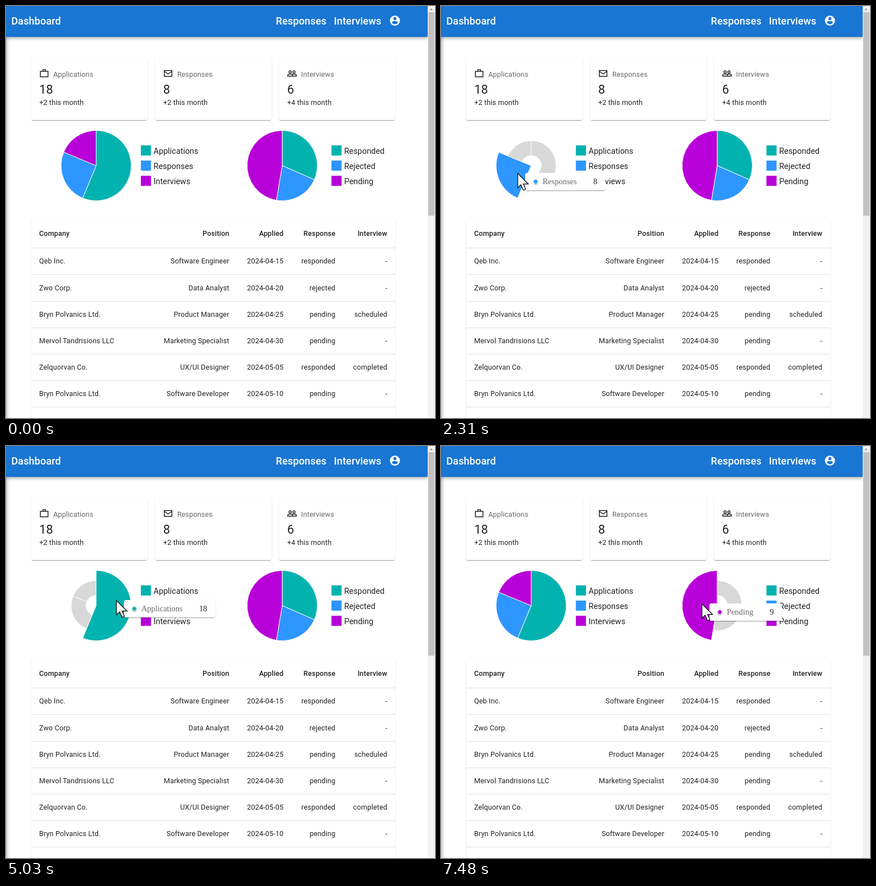
Write an HTML page that moves like this. It is 764 px wide and 733 px high and loops after 8000 ms.

```html
<!DOCTYPE html>
<html lang="en">
<head>
<meta charset="utf-8">
<title>Dashboard</title>
<style>
  html, body { margin: 0; width: 100%; height: 100%; overflow: hidden; background: #fff; }
  #stage { position: absolute; left: 0; top: 0; width: 764px; height: 733px; overflow: hidden; }
  svg, .paper, #bar { position: absolute; }
  svg { left: 0; top: 0; font: 12.6px Roboto, sans-serif; fill: rgba(0,0,0,.87); }
  .paper, .mark {
    background: #fff; border-radius: 3.6px;
    box-shadow: 0 1.8px .9px -.9px rgba(0,0,0,.2), 0 .9px .9px rgba(0,0,0,.14), 0 .9px 2.7px rgba(0,0,0,.12);
  }
  #bar {
    left: 0; top: 0; width: 751px; height: 54.5px; background: #1976d2;
    box-shadow: 0 1.8px 3.6px -.9px rgba(0,0,0,.2), 0 3.6px 4.5px rgba(0,0,0,.14), 0 .9px 9px rgba(0,0,0,.12);
  }
  #edge { position: absolute; left: 0; top: 0; width: 8px; height: 733px;
    background: linear-gradient(90deg, rgba(0,0,0,.24), rgba(0,0,0,.08) 45%, rgba(0,0,0,0)); }
  .body { letter-spacing: .135px; }
  .nav { font-size: 18px; font-weight: 500; letter-spacing: .135px; fill: #fff; }
  .head { font-weight: 500; letter-spacing: .135px; }
  .muted { letter-spacing: .135px; fill: rgba(0,0,0,.6); }
  .count { font-size: 21.6px; }
  .legend { font-size: 14.4px; }
  .icon { fill: none; stroke: #222; stroke-width: 2; }
  #tip { left: 0; top: 0; height: 31px; display: flex; align-items: center; white-space: nowrap;
    padding: 0 14.4px 0 13.6px; font: 14.4px "Liberation Serif", serif; color: rgba(0,0,0,.6); }
  .mark { width: 7.2px; height: 7.2px; border: 1.8px solid #fff; border-radius: 50%; margin-right: 8.2px; }
  #value { margin-left: 29.4px; color: rgba(0,0,0,.87); }
</style>
</head>
<body>
<div id="stage">
  <div id="edge"></div>
  <div id="bar"></div>
  <svg id="page" width="764" height="733"></svg>
  <div id="tip" class="paper"><span class="mark" id="mark"></span><span id="name"></span><span id="value"></span></div>
  <svg id="top" width="764" height="733">
    <path id="arrow" fill="#fff" stroke="#000" stroke-width="1.2" d="M.7 .9V26.3L6.4 21 10.6 30.8 14.8 29 10.8 19.7H19.6Z"/>
    <path id="beam" fill="none" stroke="#000" stroke-width="2.6" d="M-8-13h5.5L0-11 2.5-13H8M0-11V11M-8 13h5.5L0 11 2.5 13H8"/>
  </svg>
</div>
<script>
const LOOP = 8000;
const COLORS = ['#02b2af', '#2e96ff', '#b800d8'];
const RADIUS = 62.5, INSET = 18;

const $ = id => document.getElementById(id);
const page = $('page');
const mix = (a, b, p) => a + (b - a) * p;

function add(tag, attrs, content) {
  const el = document.createElementNS('http://www.w3.org/2000/svg', tag);
  for (const key in attrs) el.setAttribute(key, attrs[key]);
  if (content) el.textContent = content;
  return page.appendChild(el);
}
const text = (cls, x, y, content, anchor = 'start') =>
  add('text', { class: cls, x, y, 'text-anchor': anchor }, content);
const rect = (x, y, width, height, fill) => add('rect', { x, y, width, height, fill });

function paper(x, y, w, h) {
  const el = document.createElement('div');
  el.className = 'paper';
  el.style.cssText = `left:${x}px;top:${y}px;width:${w}px;height:${h}px`;
  $('stage').insertBefore(el, page);
}

// Header and scrollbar
text('nav', 9.4, 33, 'Dashboard');
text('nav', 480.6, 33, 'Responses');
text('nav', 584.1, 33, 'Interviews');
add('circle', { cx: 692.6, cy: 26, r: 9, fill: '#fff' });
add('circle', { cx: 692.6, cy: 22.4, r: 2.7, fill: '#1976d2' });
add('path', { d: 'M687.2 29.6c0-3.7 10.8-3.7 10.8 0c-2.6 3.9-8.2 3.9-10.8 0z', fill: '#1976d2' });
rect(751, 0, 13, 733, '#f1f1f1');
rect(752, 11, 11, 362, '#c1c1c1');
add('path', { d: 'M754 7.5L757.3 4L760.6 7.5Z', fill: '#a3a3a3' });

// Summary cards
const person = x => `M${x - 2.7} 8.5a2.7 2.7 0 1 0 5.4 0a2.7 2.7 0 1 0-5.4 0`;
const ICONS = [
  'M3 7H21V20H3ZM9 7V3H15V7',
  'M3 5H21V19H3ZM3 7L12 13L21 7',
  person(7.5) + person(16.5) + 'M1.8 18.2V16.2C1.8 13 13.2 13 13.2 16.2V18.2ZM12.5 14.6C15 13 22.2 13.4 22.2 16.2V18.2H13.2'
];
[['Applications', 18, 2], ['Responses', 8, 2], ['Interviews', 6, 4]].forEach(([title, count, extra], i) => {
  const x = 44.8 + 220.7 * i;
  paper(x, 91, 207, 112);
  add('path', { class: 'icon', d: ICONS[i], transform: `translate(${x + 14.2} 111) scale(.75)` });
  text('muted', x + 39.4, 126, title);
  text('count', x + 14.5, 156, count);
  text('body', x + 14.5, 176, `+${extra} this month`);
});

// Pies; hover lists [time, slice], with -1 for none
const pies = [
  { x: 160.5, legend: 240.2, names: ['Applications', 'Responses', 'Interviews'], values: [18, 8, 6],
    hover: [[0, -1], [1820, 1], [3395, 2], [4690, 0], [6370, -1]] },
  { x: 491.9, legend: 579.6, names: ['Responded', 'Rejected', 'Pending'], values: [6, 4, 9],
    hover: [[0, -1], [7190, 2]] }
];
for (const pie of pies) {
  pie.slices = pie.names.map((name, i) => {
    rect(pie.legend, 248 + 27 * i, 18, 18, COLORS[i]);
    text('legend', pie.legend + 22.6, 263 + 27 * i, name);
    return add('path', { transform: `translate(${pie.x} 284)`, stroke: '#fff', 'stroke-width': 1, 'stroke-linejoin': 'round' });
  });
}

// Table: one application every five days
paper(45, 380, 648, 400);
const RIGHT = [397.6, 494.2, 586.6, 679];
const applied = i => new Date(Date.UTC(2024, 3, 15 + 5 * i)).toISOString().slice(0, 10);
const entries = [
  ['Qeb Inc.', 'Software Engineer', 'responded', '-'],
  ['Zwo Corp.', 'Data Analyst', 'rejected', '-'],
  ['Bryn Polvanics Ltd.', 'Product Manager', 'pending', 'scheduled'],
  ['Mervol Tandrisions LLC', 'Marketing Specialist', 'pending', '-'],
  ['Zelquorvan Co.', 'UX/UI Designer', 'responded', 'completed'],
  ['Bryn Polvanics Ltd.', 'Software Developer', 'pending', '-']
];
function row(cls, y, company, ...cells) {
  text(cls, 59, y, company);
  cells.forEach((cell, k) => text(cls, RIGHT[k], y, cell, 'end'));
}
row('head', 409, 'Company', 'Position', 'Applied', 'Response', 'Interview');
entries.forEach(([company, position, response, interview], i) =>
  row('body', Math.round(458.3 + 47.2 * i), company, position, applied(i), response, interview));
for (let i = 0; i < 7; i++) rect(45, Math.round(430.2 + 47.2 * i), 648, 1, '#e0e0e0');

// Pointer strokes [start, end, x, y]: each runs on from where the last one stopped
const STROKES = [
  [780, 1197, 309, 574], [1197, 1545, 109, 457], [1545, 1700, 98, 365], [1700, 2030, 136, 297],
  [3170, 3380, 144, 277], [3380, 3450, 144, 270], [3450, 3640, 149, 262], [4600, 4960, 196, 274],
  [6290, 6647, 321, 284], [6647, 7133, 431, 311], [7133, 7400, 464, 280]
];
// The screen refreshes in even steps, but only during these spans
const SPANS = [[780, 2310], [3170, 3730], [4610, 5030], [6370, 7480]];
const STEP = 69.6;

function heldTime(t) {
  const span = SPANS.filter(s => t >= s[0]).pop();
  if (!span) return 0;
  return Math.min(span[1], span[0] + STEP * Math.floor((t - span[0] + 8) / STEP));
}

function pointAt(t) {
  let x = 681, y = 712;
  for (const [start, end, toX, toY] of STROKES) {
    const p = Math.max(0, Math.min(1, (t - start) / (end - start)));
    x = mix(x, toX, p);
    y = mix(y, toY, p);
  }
  return [x, y];
}

function overText(x, y) {
  const inside = (l, r, baseline) => x >= l && x <= r && y >= baseline - 16 && y <= baseline + 6;
  return inside(262, 335, 290) || inside(59, 110, 458) || inside(59, 113, 409);
}

// Damped spring (tension 120, friction 14) that stops on reaching its goal
function spring(ms) {
  if (ms >= 269) return 1;
  const s = ms / 1000, w = Math.sqrt(71);
  return 1 - Math.exp(-7 * s) * (Math.cos(w * s) + 7 / w * Math.sin(w * s));
}
const easeIn = ms => Math.min(1, ms / 200) ** 1.7;

function arc(from, to, inner, outer) {
  const at = (a, r) => `${(Math.sin(a) * r).toFixed(2)} ${(-Math.cos(a) * r).toFixed(2)}`;
  const large = to - from > Math.PI ? 1 : 0;
  const hole = inner > .01 ? `L${at(to, inner)}A${inner} ${inner} 0 ${large} 0 ${at(from, inner)}` : 'L0 0';
  return `M${at(from, outer)}A${outer} ${outer} 0 ${large} 1 ${at(to, outer)}${hole}Z`;
}

function drawPie(pie, t) {
  const past = pie.hover.filter(h => h[0] <= t);
  const [since, active] = past[past.length - 1];
  const before = past.length > 1 ? past[past.length - 2][1] : -1;
  const faded = (hovered, i) => hovered >= 0 && hovered !== i ? 1 : 0;
  const total = pie.values.reduce((a, b) => a + b);
  let angle = 0;
  pie.slices.forEach((slice, i) => {
    const end = angle + pie.values[i] / total * 2 * Math.PI;
    const size = INSET * mix(faded(before, i), faded(active, i), spring(t - since));
    const tint = mix(faded(before, i), faded(active, i), easeIn(t - since));
    slice.setAttribute('d', arc(angle, end, size, RADIUS - size));
    slice.style.fill = `color-mix(in srgb, gray ${tint * 100}%, ${COLORS[i]})`;
    slice.setAttribute('opacity', 1 - .7 * tint);
    angle = end;
  });
  return active;
}

const show = (el, on) => { el.style.display = on ? '' : 'none'; };

function draw(time) {
  const t = heldTime(time);
  show($('tip'), false);
  for (const pie of pies) {
    const active = drawPie(pie, t);
    if (active < 0) continue;
    // The tooltip trails the pointer slightly
    const [x, y] = pointAt(t - 40);
    show($('tip'), true);
    $('tip').style.transform = `translate(${Math.round(x + 14)}px,${Math.round(y)}px)`;
    $('mark').style.backgroundColor = COLORS[active];
    $('name').textContent = pie.names[active];
    $('value').textContent = pie.values[active];
  }
  const [x, y] = pointAt(t);
  const beam = overText(x, y);
  show($('arrow'), t > 0 && !beam);
  show($('beam'), t > 0 && beam);
  for (const id of ['arrow', 'beam']) $(id).setAttribute('transform', `translate(${x} ${y})`);
}

const begin = performance.now();
function tick() {
  draw((performance.now() - begin) % LOOP);
  requestAnimationFrame(tick);
}
tick();
</script>
</body>
</html>
```
